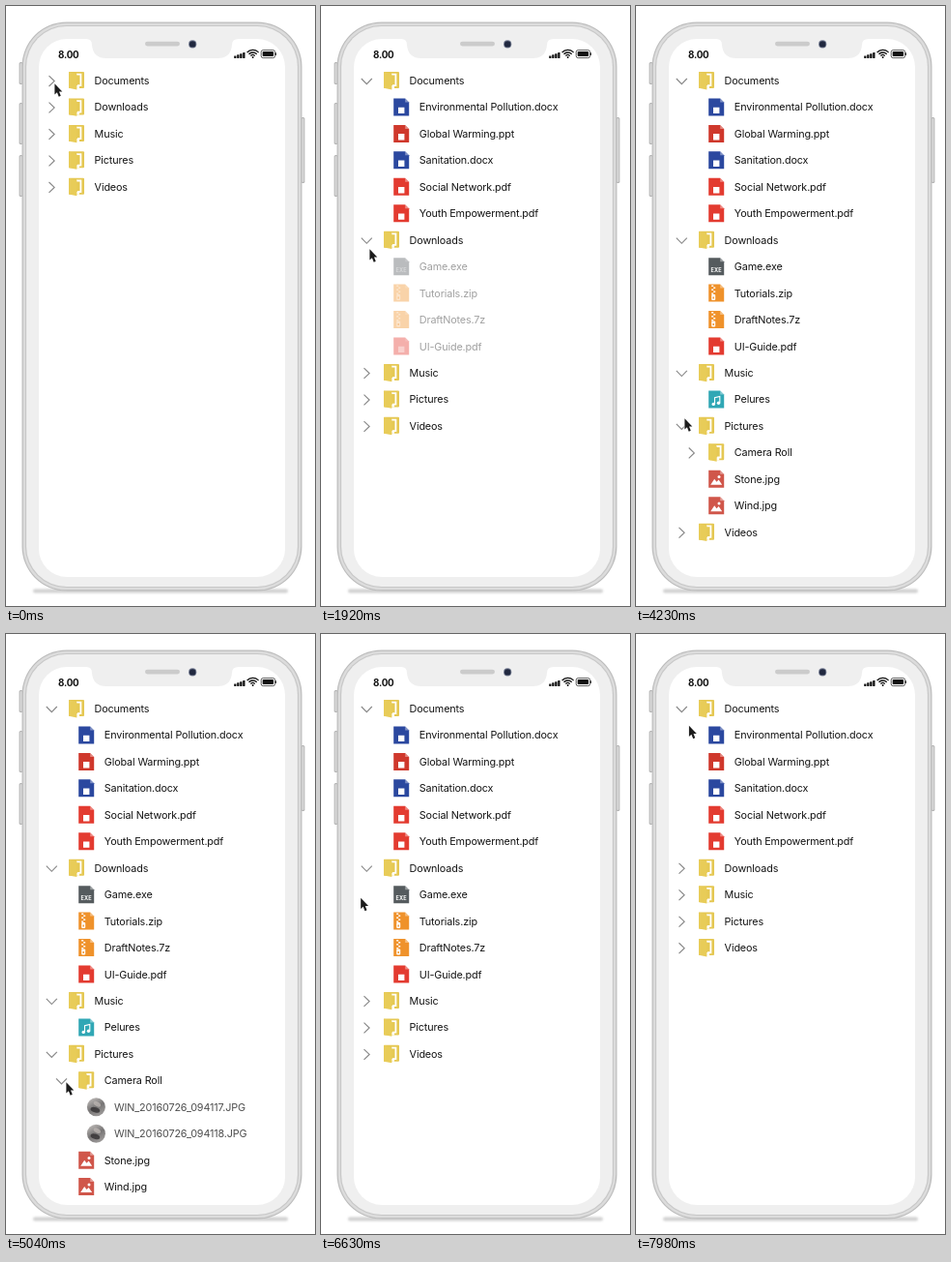
An HTML page with a canvas for the animation above (8 s loop, 320x620 px).

```html
<!DOCTYPE html>
<html lang="en">
<head>
<meta charset="utf-8">
<title>File tree</title>
<style>
html, body { margin: 0; width: 100%; height: 100%; overflow: hidden; background: #fff; }
canvas { display: block; width: 320px; height: 620px; }
</style>
</head>
<body>
<canvas id="stage"></canvas>
<script>
const LOOP = 8000, ROW = 27.45, TOP = 77, FADE_IN = 400, FADE_OUT = 150;
const FONT = 'Inter, "Liberation Sans", sans-serif';
const canvas = document.getElementById('stage');
const ctx = canvas.getContext('2d');
const dpr = window.devicePixelRatio || 1;
canvas.width = 320 * dpr;
canvas.height = 620 * dpr;

const file = (name, icon) => ({ name, icon });
const folder = (name, open, close, kids = []) => ({ name, icon: 'folder', open, close, kids });

const tree = [
  folder('Documents', 270, Infinity, [
    file('Environmental Pollution.docx', 'doc'),
    file('Global Warming.ppt', 'slides'),
    file('Sanitation.docx', 'doc'),
    file('Social Network.pdf', 'pdf'),
    file('Youth Empowerment.pdf', 'pdf')
  ]),
  folder('Downloads', 1760, 6900, [
    file('Game.exe', 'exe'),
    file('Tutorials.zip', 'zip'),
    file('DraftNotes.7z', 'zip'),
    file('UI-Guide.pdf', 'pdf')
  ]),
  folder('Music', 2700, 6300, [file('Pelures', 'music')]),
  folder('Pictures', 3600, 5640, [
    folder('Camera Roll', 4740, Infinity, [
      file('WIN_20160726_094117.JPG', 'photo'),
      file('WIN_20160726_094118.JPG', 'photo')
    ]),
    file('Stone.jpg', 'image'),
    file('Wind.jpg', 'image')
  ]),
  folder('Videos', Infinity, Infinity)
];

const pageColors = {
  doc: '#2b489f', slides: '#cf382c', pdf: '#e33b30', exe: '#555b5e',
  zip: '#ef922b', music: '#30a7b5', image: '#d0564a'
};

// Eased pointer moves between clicks
const home = { x: 50, y: 79 };
const moves = [
  { at: 380, end: 1050, x: 50, y: 98 },
  { at: 1080, end: 1650, x: 50, y: 250 },
  { at: 2050, end: 2560, x: 50, y: 384 },
  { at: 2880, end: 3240, x: 50, y: 425 },
  { at: 4440, end: 4680, x: 62, y: 462 },
  { at: 5220, end: 5490, x: 48, y: 430 },
  { at: 5760, end: 6060, x: 44, y: 381 },
  { at: 6380, end: 6730, x: 40, y: 245 },
  { at: 7180, end: 7980, x: 54.5, y: 93.5 }
];

const clamp = v => Math.max(0, Math.min(1, v));
const ease = p => p * p * (3 - 2 * p);

function fill(color, draw) {
  ctx.beginPath();
  draw();
  ctx.fillStyle = color;
  ctx.fill();
}

function stroke(color, width, draw) {
  ctx.beginPath();
  draw();
  ctx.strokeStyle = color;
  ctx.lineWidth = width;
  ctx.stroke();
}

function poly(...p) {
  ctx.moveTo(p[0], p[1]);
  for (let i = 2; i < p.length; i += 2) ctx.lineTo(p[i], p[i + 1]);
}

const box = (color, x, y, w, h, r = 0) => fill(color, () => ctx.roundRect(x, y, w, h, r));
const disc = (color, x, y, r) => fill(color, () => ctx.arc(x, y, r, 0, 7));

function label(text, x, y, style, spacing, color) {
  ctx.font = `${style} ${FONT}`;
  ctx.letterSpacing = spacing + 'px';
  ctx.fillStyle = color;
  ctx.fillText(text, x, y);
}

function button(x, y, h) {
  box('#b3b3b3', x, y, 4, h, 1.5);
  box('#dcdcdc', x + 1, y + 1, 2, h - 2, 1);
}

function drawPhone() {
  ctx.save();
  ctx.filter = 'blur(0.8px)';
  box('#d0d0d0', 28, 602.5, 264, 4, 2);
  ctx.restore();

  button(13.6, 58, 23);
  button(13.6, 100, 43);
  button(13.6, 154, 43);
  button(305.4, 115, 68);

  const rim = (color, inset) =>
    box(color, 16.5 + inset, 16.5 + inset, 290 - 2 * inset, 588 - 2 * inset, 46 - inset);
  rim('#bcbcbc', 0);
  rim('#dcdcdc', 1.2);
  rim('#c8c8c8', 3.4);
  rim('#efefef', 4.6);
  box('#fff', 34, 34, 255, 556, 29);
}

function drawNotch() {
  fill('#efefef', () => {
    ctx.moveTo(83, 33);
    ctx.lineTo(241, 33);
    ctx.lineTo(241, 34);
    ctx.quadraticCurveTo(234, 34, 234, 40);
    ctx.quadraticCurveTo(233, 54, 219, 54);
    ctx.lineTo(104, 54);
    ctx.quadraticCurveTo(90, 54, 89, 40);
    ctx.quadraticCurveTo(89, 34, 83, 34);
  });
  box('#cbcbcb', 144, 36.8, 36, 4.6, 2.3);
  disc('#737b91', 193.2, 39.4, 4.1);
  disc('#20283f', 193.2, 39.4, 3.2);
}

function drawStatus() {
  label('8.00', 54, 53.6, '700 9.8px', -0.25, '#111');

  for (let i = 0; i < 4; i++) {
    const h = 2.6 + i * 1.1;
    box('#111', 236.2 + i * 3, 54 - h, 2.3, h, 0.4);
  }
  for (let r = 3; r < 9; r += 2.6)
    stroke('#111', 1.3, () => ctx.arc(255.6, 53.6, r, -Math.PI * 0.76, -Math.PI * 0.24));
  disc('#111', 255.6, 53, 1);

  stroke('#333', 0.8, () => ctx.roundRect(264.2, 45.6, 14.4, 8, 2));
  box('#111', 265.7, 47.1, 11.4, 5, 0.8);
  box('#333', 279, 48, 1, 3, 0.5);
}

function drawChevron(x, y, open) {
  stroke('#878787', 1.15, () => open
    ? poly(x - 5.5, y - 2.6, x, y + 3, x + 5.5, y - 2.6)
    : poly(x - 2.8, y - 5.4, x + 2.8, y, x - 2.8, y + 5.4));
}

// Icons are drawn around their own centre.
function drawFolder() {
  box('#e5c853', -8, -9, 16, 17, 1);
  stroke('#fff', 1.8, () => poly(0, -6.3, 4.4, -6.3, 4.4, 5.2, 1, 5.2));
  fill('#fff', () => poly(0, 5, 3, 5, 3, 8, 0, 8));
  fill('#e8cc58', () => poly(-8, -9, 0.4, -6.6, 0.4, 9.4, -8, 7.8));
}

const plainMark = () => box('#fff', -3.2, 0.2, 6.4, 6.4);

const marks = {
  doc: plainMark,
  slides: plainMark,
  pdf: plainMark,
  exe: () => label('EXE', -5.6, 6.2, '700 5.6px', 0, '#fff'),
  zip() {
    for (let i = 0; i < 5; i++) box('#fff', i % 2 ? -3 : -5, -8 + i * 2, 2, 1.5);
    box('#fff', -5, 1.5, 4, 6, 1);
    box('#ef922b', -3.7, 4, 1.4, 2);
  },
  music() {
    stroke('#fff', 1.1, () => poly(-1.7, 5, -1.7, -1.7, 3.6, -3, 3.6, 3.6));
    disc('#fff', -3, 5, 1.7);
    disc('#fff', 2.3, 3.8, 1.7);
  },
  image() {
    fill('#fff', () => poly(-6, 6, -2, 0, 0.3, 3, 2.4, 0.8, 6, 6));
    disc('#fff', 2.8, -2.2, 1.5);
  }
};

function drawPage(kind) {
  fill(pageColors[kind], () => poly(-8, -9, 4, -9, 8, -5, 8, 9, -8, 9));
  fill('rgba(255,255,255,.4)', () => poly(4, -9, 8, -5, 4, -5));
  marks[kind]();
}

function drawPhoto() {
  const g = ctx.createLinearGradient(-5, -9, 5, 9);
  g.addColorStop(0, '#a5a09d');
  g.addColorStop(0.5, '#4a4747');
  g.addColorStop(1, '#817d7c');
  disc(g, 0, 0, 9.5);
  fill('#bdb7b3', () => ctx.ellipse(1, -3, 4, 2.2, 0.5, 0, 7));
  fill('#2f2c2e', () => ctx.ellipse(-1, 3, 5, 2.6, 0.3, 0, 7));
}

function drawRow(node, depth, index, alpha, t) {
  const dx = depth * 10.2, y = TOP + index * ROW;
  ctx.globalAlpha = alpha;
  if (node.kids) drawChevron(47.3 + dx, y + 0.6, t >= node.open && t < node.close);

  ctx.save();
  ctx.translate(73 + dx, y);
  if (node.icon === 'folder') drawFolder();
  else if (node.icon === 'photo') drawPhoto();
  else drawPage(node.icon);
  ctx.restore();

  label(node.name, 91.6 + dx, y + 4, '400 10.8px', -0.14, '#141414');
  ctx.globalAlpha = 1;
}

function reveal(node, t) {
  if (t < node.open) return 0;
  return t < node.close
    ? clamp((t - node.open) / FADE_IN)
    : clamp(1 - (t - node.close) / FADE_OUT);
}

function drawTree(t) {
  let index = 0;
  const walk = (nodes, depth, alpha) => {
    for (const node of nodes) {
      drawRow(node, depth, index++, alpha, t);
      if (!node.kids || t < node.open) continue;
      const a = reveal(node, t);
      if (a > 0 || t < node.close) walk(node.kids, depth + 1, alpha * a);
    }
  };
  ctx.save();
  ctx.beginPath();
  ctx.roundRect(34, 34, 255, 555, 29);
  ctx.clip();
  walk(tree, 0, 1);
  ctx.restore();
}

function pointerAt(t) {
  let { x, y } = home;
  for (const m of moves) {
    const k = ease(clamp((t - m.at) / (m.end - m.at)));
    x += (m.x - x) * k;
    y += (m.y - y) * k;
  }
  return [x, y];
}

function drawPointer(t) {
  const [x, y] = pointerAt(t);
  const arrow = () => {
    poly(0, 0.5, 0, 12.4, 2.7, 9.9, 4.7, 14.6, 6.9, 13.7, 5, 9.1, 8.6, 9.1);
    ctx.closePath();
  };
  ctx.save();
  ctx.translate(x + 0.4, y + 0.8);
  ctx.scale(0.92, 0.95);
  ctx.lineJoin = 'round';
  stroke('#fff', 1.6, arrow);
  fill('#1c1c1c', arrow);
  ctx.restore();
}

function frame() {
  const t = performance.now() % LOOP;
  ctx.setTransform(dpr, 0, 0, dpr, 0, 0);
  ctx.fillStyle = '#fff';
  ctx.fillRect(0, 0, 320, 620);
  drawPhone();
  drawTree(t);
  drawNotch();
  drawStatus();
  drawPointer(t);
  requestAnimationFrame(frame);
}
frame();
</script>
</body>
</html>
```
